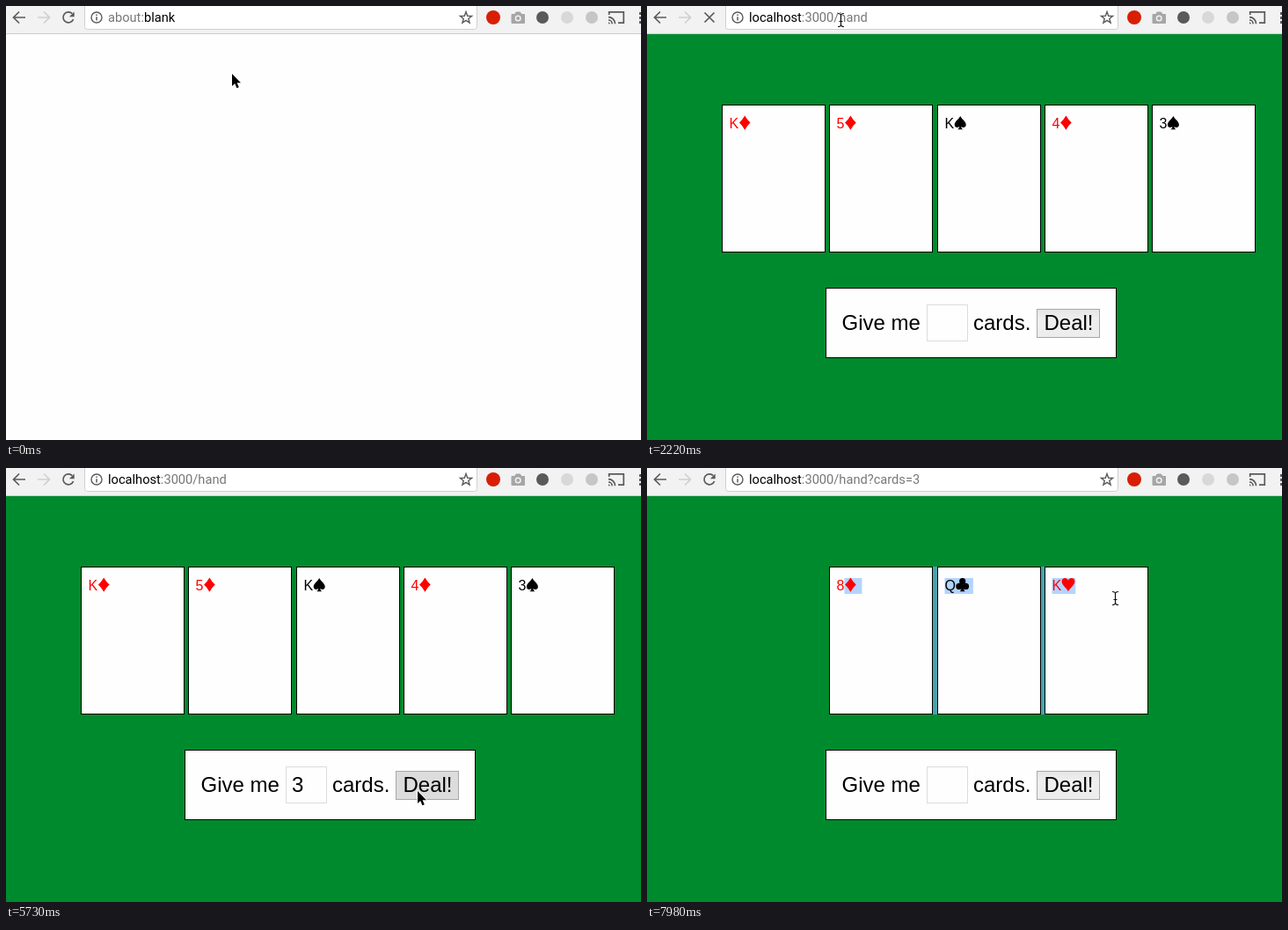
An HTML page for the animation above (8 s loop, 722 by 493 pixels).

```html
<!DOCTYPE html>
<html lang="en">
<head>
<meta charset="utf-8">
<title>Card hand</title>
<style>
  html, body { margin: 0; width: 100%; height: 100%; overflow: hidden; background: #fefefe; }
  svg { display: block; }
  text { white-space: pre; font-family: "Liberation Sans", Arial, sans-serif; }
  #url { font: 14.65px Roboto, sans-serif; fill: #777; }
  #host { fill: #000; }
  .form text { font-size: 24px; }
  .card text { font-size: 16px; }
  .line { fill: none; stroke: #5a5a5a; stroke-width: 1.7; }
  .frame { fill: #fefefe; stroke: #000; }
  .mark { fill: #b3d4fd; }
</style>
</head>
<body>
<svg width="722" height="493" viewBox="0 0 722 493">
  <defs>
    <linearGradient id="face" x2="0" y2="1">
      <stop offset="0" stop-color="#e4e4e4"/><stop offset=".35" stop-color="#efefef"/><stop offset="1" stop-color="#ececec"/>
    </linearGradient>
    <path id="diamond" d="M7 -14.5Q9.5 -10 13.3 -6.5Q9.5 -3 7 1.7Q4.500 -3 .7 -6.500Q4.500 -10 7 -14.500Z"/>
    <path id="spade" d="M7 -14C8.500 -10.500 13.500 -8 13.500 -4C13.500 -1 10 0 8 -2.200Q8.200 .3 10 1.300H4Q5.800 .3 6 -2.200C4 0 .5 -1 .5 -4C.5 -8 5.500 -10.500 7 -14Z"/>
    <path id="heart" d="M7.800 1.300C6.500 -2 .4 -6 .4 -10C.4 -14.500 6 -15.300 7.800 -11.300C9.600 -15.300 15.200 -14.500 15.200 -10C15.200 -6 9 -2 7.800 1.300Z"/>
    <g id="club">
      <circle cx="7.800" cy="-10.300" r="3.600"/><circle cx="4" cy="-4.600" r="3.600"/><circle cx="11.600" cy="-4.600" r="3.600"/>
      <path d="M7 -8H8.600Q8.300 -.5 10.800 1.300H4.800Q7.300 -.5 7 -8Z"/>
    </g>
  </defs>

  <g id="page">
    <rect y="32" width="722" height="461" fill="#008a2e"/>
    <g id="cards"></g>
    <g class="form">
      <rect class="frame" x="203.500" y="320.500" width="330" height="79"/>
      <text x="221.500" y="368">Give me</text>
      <text x="371" y="368">cards.</text>
      <rect x="318.500" y="339.500" width="46" height="41" fill="#fefefe" stroke="#dcdcdc"/>
      <g id="focus">
        <rect x="317" y="338" width="49" height="44" rx="3" fill="none" stroke="#a9cdf6" stroke-width="4"/>
        <rect x="318" y="339" width="47" height="42" rx="1.500" fill="#fefefe" stroke="#5fa4ee" stroke-width="2"/>
        <path id="caret" d="M.5 346V374" stroke="#000"/>
      </g>
      <text id="typed" x="325" y="368">3</text>
      <rect id="face-box" x="443.500" y="344.500" width="71" height="32" fill="url(#face)" stroke="#a8a8a8"/>
      <text x="451.500" y="368">Deal!</text>
    </g>
    <g id="hint">
      <rect x="317.500" y="380.500" width="47" height="26" fill="#fefefe" stroke="#a9c0e6"/>
      <text x="326" y="399.500" font-size="14" font-weight="bold">3</text>
    </g>
  </g>

  <rect width="722" height="31" fill="#f2f2f2"/>
  <rect y="31" width="722" height="1" fill="#cdcdcd"/>
  <g id="panel">
    <rect y="27" width="722" height="167" fill="#fefefe"/>
    <rect y="194" width="722" height="1" fill="#cdcdcd"/>
    <rect width="722" height="31" fill="#f2f2f2"/>
  </g>
  <rect id="bar" fill="#fff"/>

  <path class="line" d="M22 13H9M15 6.500L8.500 13L15 19.500"/>
  <path class="line" d="M36 13H49M43 6.500L49.500 13L43 19.500" style="stroke:#cfcfcf"/>
  <g id="reload">
    <path class="line" d="M75.300 8.700A6 6 0 1 0 76.600 15"/>
    <path d="M77.700 6.400V12.200H71.900Z" fill="#5a5a5a"/>
  </g>
  <path id="halt" class="line" d="M65.500 7.500L76.500 18.500M76.500 7.500L65.500 18.500"/>
  <circle class="line" cx="103" cy="13" r="6" style="stroke-width:1.400"/>
  <path class="line" d="M103 9.500V11M103 12.300V16.500" style="stroke-width:1.500"/>
  <polygon id="star" class="line" style="stroke-width:1.400"/>

  <circle cx="554" cy="13" r="8" fill="#d81e05"/>
  <path d="M575 9.500H578.500L580 7H584.500L586 9.500H589.500V19.500H575Z" fill="#a6a6a6" stroke="#a6a6a6" stroke-linejoin="round"/>
  <circle cx="582.200" cy="14" r="2.800" fill="#a6a6a6" stroke="#f2f2f2" stroke-width="1.500"/>
  <circle cx="610" cy="13" r="7" fill="#5a5a5a"/>
  <circle cx="638" cy="13" r="7" fill="#d8d8d8"/>
  <circle cx="666" cy="13" r="7" fill="#c6c6c6"/>
  <path class="line" d="M685.700 10V6.800H702.300V19.200H696M685 12.700A7.500 7.500 0 0 1 692.500 20.200M685 16A4.200 4.200 0 0 1 689.200 20.200"/>
  <path d="M685 18V20.200H687.300Z" fill="#5a5a5a"/>
  <path d="M720 7h2v3h-2zM720 12h2v3h-2zM720 17h2v3h-2z" fill="#5a5a5a"/>

  <rect id="urlMark" class="mark" x="116" y="5" width="76" height="17"/>
  <text id="url" x="116" y="18"><tspan id="pre"></tspan><tspan id="host"></tspan><tspan id="rest"></tspan></text>
  <path id="urlCaret" d="M.5 5V21" stroke="#000"/>

  <path id="arrow" d="M0 0V14L3.200 11L5.400 16.200L7.800 15.200L5.600 10.200H10Z" stroke="#fff" stroke-width="1.600" paint-order="stroke"/>
  <g id="beam" fill="none">
    <path d="M-3.500 -7.500Q0 -7.500 0 -5Q0 -7.500 3.500 -7.500M0 -5V5M-3.500 7.500Q0 7.500 0 5Q0 7.500 3.500 7.500M-2 1.500H2" stroke="#fff" stroke-width="2.600" opacity=".8"/>
    <path d="M-3.500 -7.500Q0 -7.500 0 -5Q0 -7.500 3.500 -7.500M0 -5V5M-3.500 7.500Q0 7.500 0 5Q0 7.500 3.500 7.500M-2 1.500H2" stroke="#111" stroke-width="1.200"/>
  </g>
</svg>
<script>
const $ = id => document.getElementById(id);
const show = (id, on) => $(id).style.display = on ? "" : "none";
const set = (id, attrs) => { for (const k in attrs) $(id).setAttribute(k, attrs[k]); };
// Latest value whose start time has passed
const at = (list, t) => list.filter(([start]) => start <= t).pop()[1];

const LOOP = 8000;
const FIRST = [[0, "K", "diamond"], [1, "5", "diamond"], [2, "K", "spade"], [3, "4", "diamond"], [4, "3", "spade"]];
const SECOND = [[1, "8", "diamond"], [2, "Q", "club"], [3, "K", "heart"]];
const ADVANCE = { K: 10.7, Q: 12.4 };

const URLS = [
  [0, ["about:", "blank", ""]],
  [820, ["", "", ""]],
  [1000, ["", "local", ""]],
  [1540, ["", "localhost", ":3000/hand"]],
  [5850, ["", "localhost", ":3000/hand?cards=3"]]
];
const MOVES = [
  [0, 257, 77], [180, 257, 77], [440, 220, 16], [2990, 220, 16], [3380, 256, 171],
  [3700, 256, 171], [3860, 392, 364], [4060, 392, 364], [4330, 351, 363], [5030, 351, 363],
  [5640, 468, 367], [6300, 468, 367], [6900, 315, 230], [7110, 315, 230],
  [7400, 224, 137], [7450, 224, 137], [7930, 531, 148], [7980, 532, 148], [LOOP, 532, 148]
];
const POINTERS = [
  [0, "arrow"], [400, "beam"], [1540, "arrow"], [2020, "beam"], [3090, "arrow"],
  [3830, "beam"], [5420, "arrow"], [7300, "beam"]
];

function pointerAt(t) {
  const i = Math.max(1, MOVES.findIndex(m => m[0] > t));
  const [t0, x0, y0] = MOVES[i - 1], [t1, x1, y1] = MOVES[i];
  const p = (t - t0) / (t1 - t0), e = p * p * (3 - 2 * p);
  return [Math.round(x0 + (x1 - x0) * e), Math.round(y0 + (y1 - y0) * e)];
}

// Cards, with text and gaps highlighted up to x = reach
function cardsMarkup(hand, reach) {
  return hand.map(([slot, rank, suit], i) => {
    const x = Math.round(85 + slot * 122.25), textX = x + 8.5;
    const suitX = textX + (ADVANCE[rank] || 8.9);
    const from = i ? textX : suitX;
    const end = suitX + (i < hand.length - 1 ? 20 : 16);
    const width = Math.min(reach, end) - from;
    const mark = width > 0 ? `<rect class="mark" x="${from}" y="125" width="${width}" height="18"/>` : "";
    const gap = i < hand.length - 1 && reach > x + 118
      ? `<rect x="${x + 118}" y="112" width="5" height="168" fill="#4aa3ae"/>` : "";
    const color = suit === "spade" || suit === "club" ? "#000" : "#f00";
    return `${gap}<g class="card" fill="${color}">
      <rect class="frame" x="${x + .5}" y="112.5" width="117" height="167"/>${mark}
      <text x="${textX}" y="139">${rank}</text>
      <use href="#${suit}" x="${suitX}" y="139"/></g>`;
  }).join("");
}

let lastCards = "";
function draw(t) {
  const [x, y] = pointerAt(t), kind = at(POINTERS, t);
  show("arrow", kind === "arrow");
  show("beam", kind === "beam");
  set(kind, { transform: `translate(${kind === "beam" ? x + .5 : x} ${y})` });

  const editing = t >= 650 && t < 2020;
  set("bar", editing
    ? { x: 90.5, y: .5, width: 444, height: 25, rx: 3, stroke: "#5aa3ee", "stroke-width": 1.4 }
    : { x: 89.5, y: -4.5, width: 446, height: 31, rx: 3, stroke: "#cfcfcf", "stroke-width": 1 });
  show("star", !editing);
  show("urlMark", t >= 650 && t < 820);
  show("urlCaret", t >= 820 && t < 2020);
  const parts = at(URLS, t);
  ["pre", "host", "rest"].forEach((id, i) => $(id).textContent = parts[i]);
  const caretX = t < 1000 ? 116 : t < 1540 ? 151 : 251;
  set("urlCaret", { transform: `translate(${caretX} 0)` });
  show("panel", t >= 1600 && t < 2020);

  const loading = t >= 2020 && t < 2310 || t >= 5850 && t < 5980;
  show("halt", loading);
  show("reload", !loading);

  show("page", t >= 2220);
  const markup = cardsMarkup(t < 5930 ? FIRST : SECOND, t < 7450 ? 0 : x);
  if (markup !== lastCards) $("cards").innerHTML = lastCards = markup;
  show("focus", t >= 4380 && t < 5730);
  set("caret", { transform: `translate(${t < 4850 ? 325 : 339} 0)` });
  show("typed", t >= 4850 && t < 5930);
  show("hint", t >= 4850 && t < 5680);
  set("face-box", { fill: t >= 5730 && t < 5850 ? "#dcdcdc" : "url(#face)" });
}

set("star", {
  points: Array.from({ length: 10 }, (_, i) => {
    const r = i % 2 ? 2.9 : 6.9, a = i * Math.PI / 5;
    return [523 + r * Math.sin(a), 13.5 - r * Math.cos(a)].map(v => v.toFixed(1));
  }).join(" ")
});

const start = performance.now();
function tick(now) {
  draw(Math.max(0, now - start) % LOOP);
  requestAnimationFrame(tick);
}
tick(start);
</script>
</body>
</html>
```
